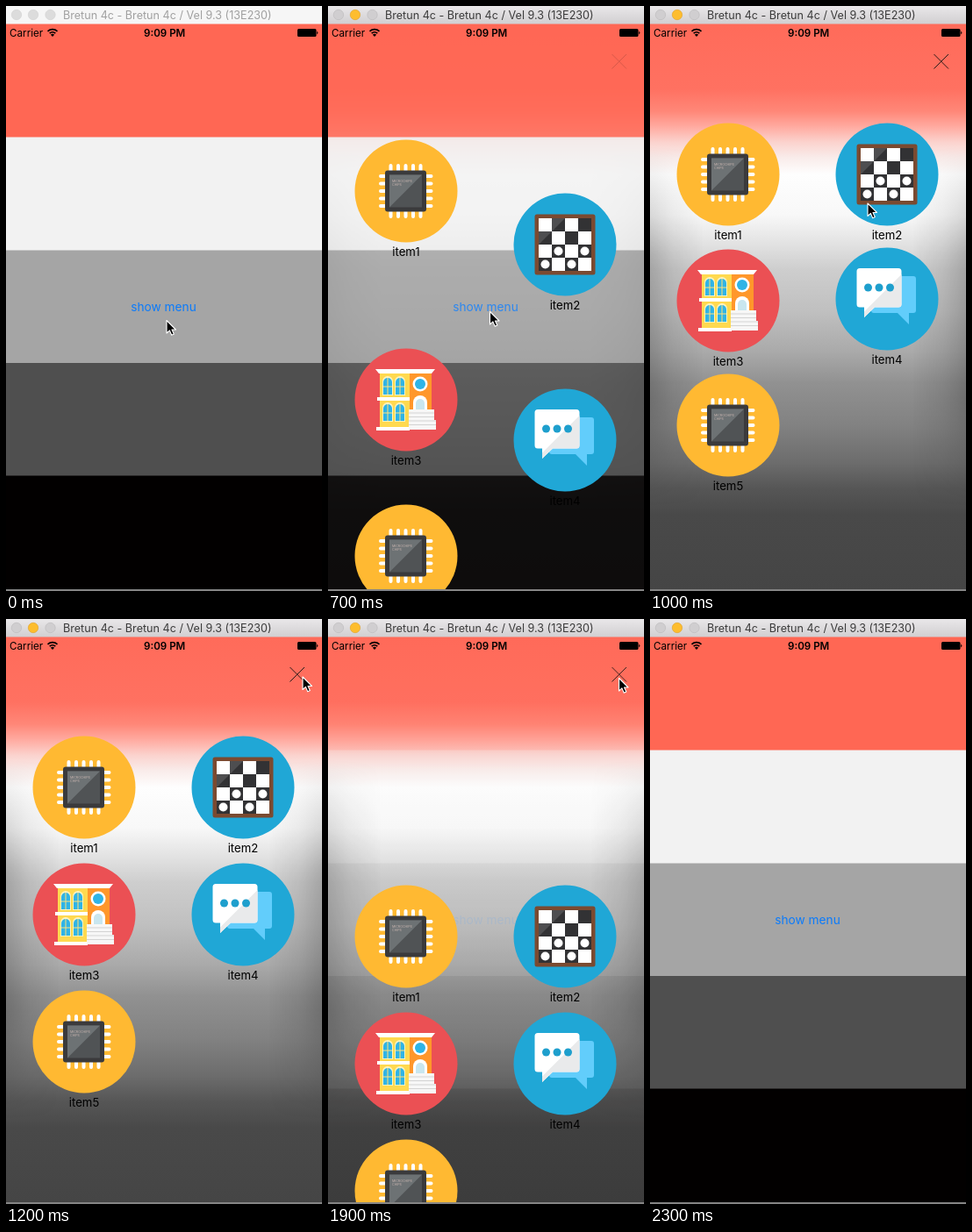
Write an HTML page that moves like this. It is 360 by 667 pixels and loops after 2.4 s.

```html
<!DOCTYPE html>
<html lang="en">
<head>
<meta charset="utf-8">
<title>Menu demo</title>
<style>
  html, body { margin: 0; width: 100%; height: 100%; overflow: hidden; background: #000; }
  svg { display: block; width: 360px; height: 667px; font-family: Inter, Roboto, sans-serif; }
  .mid { text-anchor: middle; }
</style>
</head>
<body>
<svg viewBox="0 0 360 667">
  <defs>
    <linearGradient id="bar" x2="0" y2="1">
      <stop stop-color="#e9e7e9"/><stop offset="1" stop-color="#d1cfd1"/>
    </linearGradient>
    <linearGradient id="blur" gradientUnits="userSpaceOnUse" x1="0" y1="0" x2="0" y2="667"></linearGradient>
    <linearGradient id="sides">
      <stop stop-opacity=".2"/><stop offset=".07" stop-opacity=".09"/><stop offset=".17" stop-opacity="0"/>
      <stop offset=".83" stop-opacity="0"/><stop offset=".93" stop-opacity=".09"/><stop offset="1" stop-opacity=".2"/>
    </linearGradient>
    <linearGradient id="fade" x2="0" y2="1">
      <stop stop-color="#000"/><stop offset=".3" stop-color="#fff"/>
      <stop offset=".7" stop-color="#fff"/><stop offset="1" stop-color="#000"/>
    </linearGradient>
    <mask id="soft"><rect y="160" width="360" height="410" fill="url(#fade)"/></mask>
    <clipPath id="screen"><rect y="21" width="360" height="644"/></clipPath>

    <g id="chip">
      <circle r="58.5" fill="#ffb932"/>
      <path id="pins" stroke="#fff" stroke-width="4" stroke-linecap="round"/>
      <rect x="-24" y="-23.5" width="47" height="47" rx="3" fill="#3a3a3c"/>
      <rect x="-19" y="-18.5" width="37" height="37" fill="#505355"/>
      <path d="M-19-18.5H18L-19 18.5Z" fill="#6d7274"/>
      <g font-size="3.6" fill="#c9b5b0"><text x="-16" y="-10.5">MICROCHIPS</text><text x="-16" y="-6.5">CHIPS</text></g>
    </g>

    <g id="chess">
      <circle r="58.5" fill="#20a7d6"/>
      <rect x="-34.5" y="-34.5" width="69" height="69" rx="2.5" fill="#7b4a30"/>
      <rect x="-30" y="-30" width="60" height="60" fill="#fff"/>
      <path id="squares" fill="#323234"/>
      <path d="M-30-30H0L-30 0Z" fill="#fff" opacity=".14"/>
      <g fill="#fff">
        <circle cx="-7.5" cy="7.5" r="5"/><circle cx="22.5" cy="7.5" r="5"/>
        <circle cx="-22.5" cy="22.5" r="5"/><circle cx="7.5" cy="22.5" r="5"/>
      </g>
    </g>

    <g id="pane">
      <path d="M-6 11V-5a6 6 0 0 1 12 0V11Z" fill="#fff3c0"/>
      <path d="M-5 10V-4a5 5 0 0 1 10 0V10Z" fill="#2fb4e6"/>
      <path d="M-5 1H5M0-9V10" stroke="#ffe17a"/>
    </g>
    <g id="house">
      <circle r="58.5" fill="#eb5054"/>
      <path d="M-30-31H4V33H-30Z" fill="#ffd94f"/>
      <path d="M4-31H29V33H4Z" fill="#ff972b"/>
      <path d="M-35-35H33L29-30H-31ZM-33-3H4V1H-33ZM-34 31H4V35H-34Z" fill="#fff"/>
      <use href="#pane" x="-21" y="-16"/><use href="#pane" x="-7" y="-16"/>
      <use href="#pane" x="-21" y="14"/><use href="#pane" x="-7" y="14"/>
      <circle cx="16" cy="-18" r="8.5" fill="#fff"/><circle cx="16" cy="-18" r="6" fill="#2fb4e6"/>
      <path d="M8 19V3a8 8 0 0 1 16 0V19Z" fill="#fff"/>
      <path d="M11 19V4a5 5 0 0 1 10 0V19Z" fill="#c9e6ef"/>
      <path d="M3 11H32V23H34V34H3Z" fill="#f7f7f7"/>
      <path d="M3 15H32M3 19.500H32M3 24H34M3 28.500H34" stroke="#d3d3d3"/>
    </g>

    <g id="chat">
      <circle r="58.5" fill="#20a7d6"/>
      <path d="M-15-26H30a3 3 0 0 1 3 3V13a3 3 0 0 1-3 3H25V29L12 16H-15a3 3 0 0 1-3-3V-23a3 3 0 0 1 3-3Z" fill="#62cdfb"/>
      <path d="M-31-35H13a3.500 3.500 0 0 1 3.500 3.500V6a3.500 3.500 0 0 1-3.500 3.500H-14L-26 21V9.500H-31a3.500 3.500 0 0 1-3.500-3.500V-31.500a3.500 3.500 0 0 1 3.500-3.500Z" fill="#fff"/>
      <path d="M16.500-28V6a3.500 3.500 0 0 1-3.500 3.500H-14L-26 21V14.500Z" fill="#e9eaeb"/>
      <g fill="#1e9fcd"><circle cx="-21.500" cy="-13" r="4.500"/><circle cx="-9" cy="-13" r="4.500"/><circle cx="3.500" cy="-13" r="4.500"/></g>
    </g>
  </defs>

  <path d="M0 20H360V150H0Z" fill="#ff6754"/>
  <path d="M0 149.500H360V279H0Z" fill="#f2f2f2"/>
  <path d="M0 278.500H360V407H0Z" fill="#a5a5a5"/>
  <path d="M0 407H360V536H0Z" fill="#4f4f4f"/>
  <path d="M0 535.500H360V667H0Z" fill="#020000"/>
  <text class="mid" x="179.500" y="348" font-size="13.700" fill="#0b7bfb">show menu</text>

  <g clip-path="url(#screen)">
    <g id="veil">
      <path d="M0 21H360V667H0Z" fill="url(#blur)"/>
      <path d="M0 160H360V570H0Z" fill="url(#sides)" mask="url(#soft)"/>
      <path d="M323.500 55L340 71.500M340 55L323.500 71.500" stroke="#2a1a18"/>
    </g>
    <g id="items"></g>
  </g>

  <path d="M0 665H360V667H0Z" fill="#858585"/>
  <text x="4" y="34.500" font-size="11.700">Carrier</text>
  <g fill="none" stroke="#000" stroke-width="1.700">
    <path d="M47.500 28.800a8 8 0 0 1 11 0M49.700 31.200a4.800 4.800 0 0 1 6.600 0"/>
  </g>
  <path d="M53 35L50.900 32.800a3 3 0 0 1 4.200 0Z"/>
  <text class="mid" x="180.700" y="34.500" font-size="11.600" font-weight="600">9:09 PM</text>
  <rect x="332" y="26" width="21.500" height="9" rx="1.500"/>
  <path d="M354.200 28.800a2 2 0 0 1 0 3.600Z"/>

  <rect id="titlebar" width="360" height="20.500"/>
  <g id="lights" stroke-width=".6">
    <circle cx="12" cy="10" r="5.700"/><circle cx="31" cy="10" r="5.700"/><circle cx="50.500" cy="10" r="5.700"/>
  </g>
  <text id="title" x="65" y="14.700" font-size="12.600">Bretun 4c - Bretun 4c / Vel 9.3 (13E230)</text>

  <path id="cursor" d="M0 0V14.500L3.400 11.400L5.700 16.700L8.300 15.600L6 10.500H10.500Z"
        stroke="#fff" stroke-width="1.100" stroke-linejoin="round"/>
</svg>
<script>
const $ = id => document.getElementById(id);
const LOOP = 2400, STEP = 100;

$('pins').setAttribute('d', [-17, -8.5, 0, 8.5, 17]
  .map(p => `M${p - .5}-29V29M-29 ${p}H28.5`).join(''));

let squares = '';
for (let r = 0; r < 4; r++)
  for (let c = 0; c < 4; c++)
    if ((r + c) % 2) squares += `M${c * 15 - 30} ${r * 15 - 30}h15v15h-15Z`;
$('squares').setAttribute('d', squares);

// Blurred backdrop: y and colour
$('blur').innerHTML = ('21 ff6b5a,95 ff7161,120 ff8778,138 ffaba1,155 fbd2cd,172 f9ebe9,192 fefefe,238 f8f8f8,' +
  '270 e3e3e3,300 cecece,350 bfbfbf,395 a9a9a9,430 919191,480 818181,520 6d6d6d,550 565656,580 494949,667 454545')
  .split(',').map(s => s.split(' '))
  .map(([y, c]) => `<stop offset="${y / 667}" stop-color="#${c}"/>`).join('');

// Item offsets from rest, every 100 ms from 700 ms
const items = [
  ['chip',  89,  192, [19, -3, 0, 0, 0]],
  ['chess', 270, 192, [80, -15, -5, 0, 0]],
  ['house', 89,  337, [112, -21, -9, -1, 0]],
  ['chat',  270, 337, [158, -26, -13, -3, 0]],
  ['chip',  89,  482, [145, -16, -14, -4, 0]],
];
$('items').innerHTML = items.map(([icon], i) =>
  `<g><use href="#${icon}"/><text class="mid" y="73.500" font-size="13.200">item${i + 1}</text></g>`).join('');
const groups = [...$('items').children];

// Linear interpolation over [time, value] keys
function at(t, keys) {
  const i = keys.findIndex(k => k[0] > t);
  if (i < 0) return keys[keys.length - 1][1];
  if (!i) return keys[0][1];
  const [t0, a] = keys[i - 1], [t1, b] = keys[i];
  return a + (b - a) * (t - t0) / (t1 - t0);
}

const veil = [[600, 0], [700, .18], [800, .83], [900, 1], [1800, 1], [1900, .88], [2000, .61], [2100, .3], [2200, .08], [2300, 0]];
const fall = [[1800, 0], [1900, 170], [2000, 514], [2100, 750]];
const cursorX = [[0, 183], [400, 184.5], [800, 184.5], [900, 195], [1000, 248], [1100, 315], [1200, 338], [1400, 331.5]];
const cursorY = [[0, 358.5], [400, 348.5], [800, 348.5], [900, 328], [1000, 225], [1100, 105], [1200, 66], [1400, 67.5]];

function draw(t) {
  const active = t >= 400;
  $('titlebar').setAttribute('fill', active ? 'url(#bar)' : '#f6f6f6');
  $('title').setAttribute('fill', active ? '#3b3b3b' : '#a0a0a0');
  [...$('lights').children].forEach((dot, i) => {
    const lit = active && i === 1;
    dot.setAttribute('fill', lit ? '#fdbd2e' : active ? '#d0ced0' : '#dcdcdc');
    dot.setAttribute('stroke', lit ? '#e0a028' : active ? '#bbb9bb' : '#d0d0d0');
  });

  $('veil').setAttribute('opacity', at(t, veil));
  $('items').style.display = t >= 700 && t < 2100 ? '' : 'none';
  items.forEach(([, x, y, rise], i) => {
    const dy = at(t, rise.map((d, k) => [700 + k * 100, d])) + at(t, fall);
    groups[i].setAttribute('transform', `translate(${x} ${y + dy})`);
  });

  $('cursor').style.display = t < 2300 ? '' : 'none';
  $('cursor').setAttribute('transform', `translate(${at(t, cursorX)} ${at(t, cursorY)})`);
}

const start = performance.now();
function tick() {
  const t = (performance.now() - start) % LOOP;
  draw(Math.floor(t / STEP) * STEP);
  requestAnimationFrame(tick);
}
tick();
</script>
</body>
</html>
```
